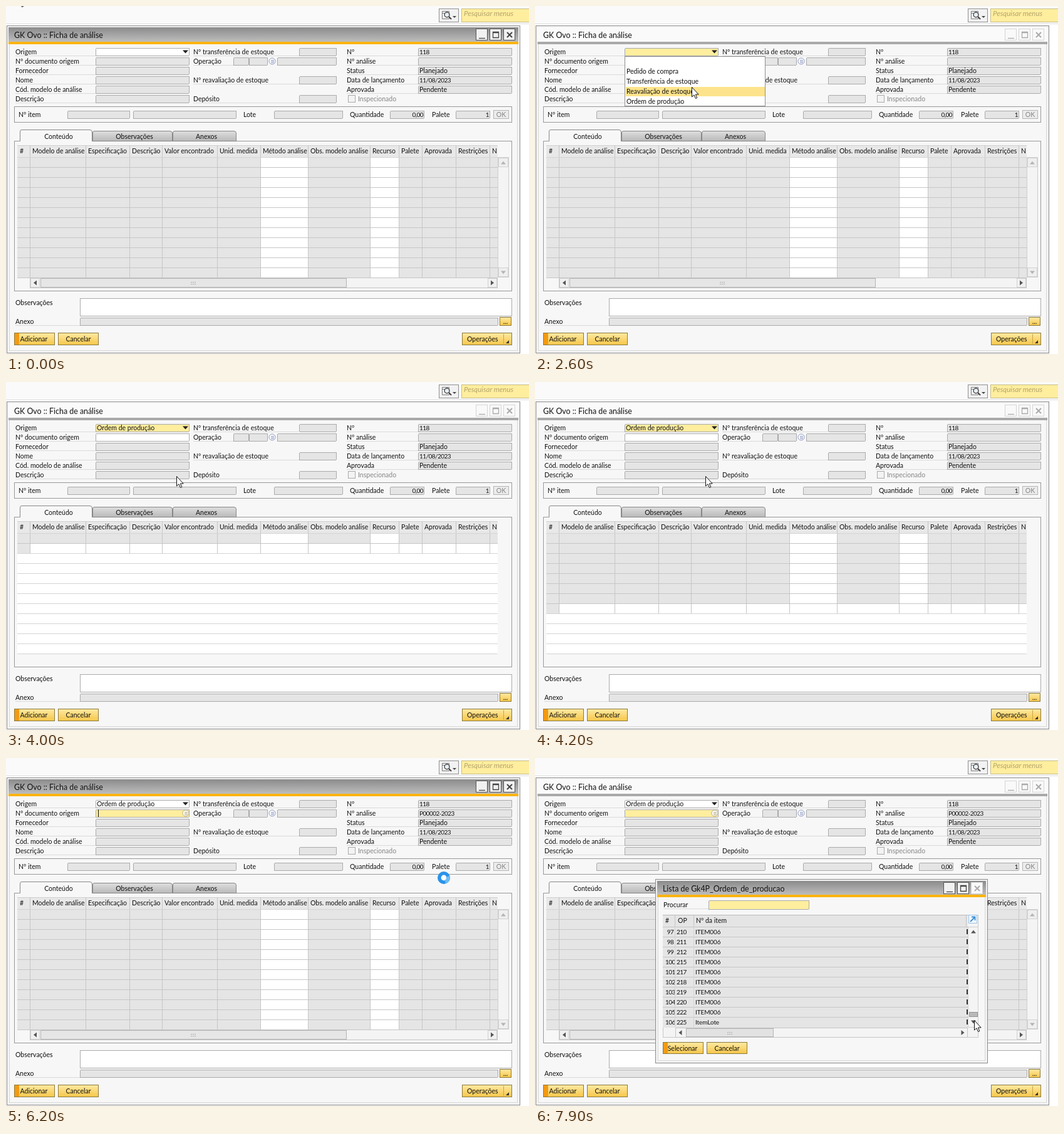
An HTML page that plays this animation: 835x555 px, repeating every 8 s.

```html
<!DOCTYPE html>
<html lang="pt-BR">
<head>
<meta charset="utf-8">
<style>
html, body { margin: 0; width: 100%; height: 100%; overflow: hidden; background: #fff; }
svg { display: block; width: 835px; height: 555px; font: 10.5px Lato, "Open Sans", sans-serif; cursor: default; }
rect, line { shape-rendering: crispEdges; }
text { fill: #111; white-space: pre; }
.num { font-size: 10px; letter-spacing: -.55px; }
.code { font-size: 10px; letter-spacing: -.1px; }
.title { font-size: 12.4px; }
.hint { font-size: 11.5px; font-style: italic; fill: #b3a56c; }
.dim { fill: #858585; }
</style>
</head>
<body>
<svg id="stage" viewBox="0 0 835 555">
  <defs>
    <linearGradient id="bar" x2="0" y2="1"><stop stop-color="#8b8b8b"/><stop offset="1" stop-color="#bdbdbd"/></linearGradient>
    <linearGradient id="gold" x2="0" y2="1"><stop stop-color="#ffeaa2"/><stop offset="1" stop-color="#f5c64a"/></linearGradient>
    <linearGradient id="tab" x2="0" y2="1"><stop stop-color="#dedede"/><stop offset="1" stop-color="#b9b9b9"/></linearGradient>
    <linearGradient id="knob" x2="0" y2="1"><stop stop-color="#fff"/><stop offset="1" stop-color="#dcdcdc"/></linearGradient>
  </defs>
</svg>
<script>
const LOOP = 8000, STEP = 100;
const GREY = '#e5e5e5', EDGE = '#ababab', YELLOW = '#ffee9e', PAGE = '#f7f7f7', GRID = '#c6c6c6';
const stage = document.getElementById('stage');

function el(tag, attrs, parent) {
  const n = document.createElementNS('http://www.w3.org/2000/svg', tag);
  for (const k in attrs) n.setAttribute(k, attrs[k]);
  return parent.appendChild(n);
}
const group = (p = stage) => el('g', {}, p);
const show = (n, on) => { n.style.display = on ? '' : 'none'; };

function box(p, x, y, w, h, fill, edge, rx = 0) {
  return edge
    ? el('rect', { x: x + .5, y: y + .5, width: w - 1, height: h - 1, fill, stroke: edge, rx }, p)
    : el('rect', { x, y, width: w, height: h, fill, rx }, p);
}
const hline = (p, x, x2, y, c) => box(p, x, y, x2 - x, 1, c);
const vline = (p, x, y, y2, c) => box(p, x, y, 1, y2 - y, c);
const path = (p, d, fill, stroke = 'none', w = 1) => el('path', { d, fill, stroke, 'stroke-width': w }, p);

// Text is placed by the middle of its line.
function text(p, x, cy, str, cls = '', anchor = 'start') {
  const n = el('text', { x, y: cy + 4, class: cls, 'text-anchor': anchor }, p);
  n.textContent = str;
  return n;
}
function field(p, x, x2, cy, value = '', end = false, fill = GREY) {
  const r = box(p, x, cy - 6, x2 - x, 13, fill, EDGE, 1.5);
  if (value) text(p, end ? x2 - 2 : x + 2, cy, value, /\d/.test(value) ? 'num' : '', end ? 'end' : 'start');
  return r;
}
function label(p, x, x2, cy, str) {
  hline(p, x, x2, cy + 6, '#dadada');
  text(p, x, cy, str);
}
function goldButton(p, x, y, w, h, str, main) {
  box(p, x, y, w, h, 'url(#gold)', '#8d7a3c', 1);
  if (main) box(p, x + 1, y + 1, 7, h - 2, '#f39a12');
  text(p, x + w / 2 + (main ? -1 : 0), y + h / 2, str, '', 'middle');
}
function arrow(p, x, y, dir, c = '#555') {
  const turn = { up: 0, right: 90, down: 180, left: 270 }[dir];
  el('path', { d: 'M-4 2.5L0-2.5L4 2.5Z', fill: c, transform: `translate(${x} ${y}) rotate(${turn})` }, p);
}
function grip(p, x, y) {
  for (let i = 0; i < 6; i++) box(p, x + i % 3 * 3, y + (i > 2 ? 2 : -1), 2, 1, '#aaa');
}
function listIcon(p, x, y, c) {
  el('circle', { cx: x, cy: y, r: 5, fill: '#fff', stroke: c }, p);
  for (const d of [-2, 0, 2]) hline(p, x - 2.5, x + 2.5, y + d, c);
}

function captionButtons(p, x, y, live, closable = true) {
  ['M5 15.5H15', 'M5.5 5.5H14.5V14.5H5.5ZM5 6.5H15', 'M6 6L14 14M14 6L6 14'].forEach((d, i) => {
    const on = live && (closable || i < 2);
    const g = el('g', { transform: `translate(${x + i * 22} ${y})` }, p);
    box(g, 0, 0, 19, 19, on ? '#f1f1f1' : '#f9f9f9', on ? '#555' : '#d5d5d5');
    path(g, d, 'none', on ? '#444' : '#aaa', i === 2 ? 2 : 1.3);
  });
}
function frame(p, x, y, w, h, bar, title, closable) {
  box(p, x, y, w, h, '#f2f2f2', '#8c8c8c', 1);
  box(p, x + 4, y + 4, w - 8, h - 8, PAGE, '#d9d9d9');
  const [off, on] = [false, true].map(live => {
    const g = group(p);
    box(g, x + 3, y + 3, w - 6, bar, live ? 'url(#bar)' : '#fafafa');
    box(g, x + 3, y + 3 + bar, w - 6, 4, live ? '#fbb40f' : '#a9a9a9');
    captionButtons(g, x + w - 71, y + 5, live, closable);
    return g;
  });
  text(p, x + 12, y + 16, title, 'title');
  return live => { show(on, live); show(off, !live); };
}

// Top strip
box(stage, 0, 0, 835, 28, '#fafafa');
hline(stage, 0, 835, 28, '#dedede');
box(stage, 691, 4, 32, 22, '#f2f2f2', '#8f8f8f', 1);
path(stage, 'M696.5 8.5H707.5V20.5H696.5ZM696.5 11.5H707.5', '#fff', '#777');
el('circle', { cx: 704, cy: 14, r: 4, fill: '#e6eef4', stroke: '#444', 'stroke-width': 1.4 }, stage);
path(stage, 'M707 17L711 21', 'none', '#444', 2);
path(stage, 'M713 16H719L716 19Z', '#444');
box(stage, 727, 4, 112, 22, YELLOW, '#c9bd85', 1);
text(stage, 731, 12, 'Pesquisar menus', 'hint');

// Main window
const win = group();
const setActive = frame(win, 1, 31, 820, 523, 23, 'GK Ovo :: Ficha de análise');

['Origem', 'Nº documento origem', 'Fornecedor', 'Nome', 'Cód. modelo de análise', 'Descrição']
  .forEach((s, i) => label(win, 15, 143, 73 + i * 15, s));
const combo = field(win, 143, 293, 73);
const doc = field(win, 143, 293, 88);
for (let i = 2; i < 6; i++) field(win, 143, 293, 73 + i * 15);
path(win, 'M282 70.5H291L286.5 75.5Z', '#222');
const origin = text(win, 145, 73, 'Ordem de produção');
const docIcon = group(win);
listIcon(docIcon, 287, 88, '#b9ad80');
const caret = vline(win, 147, 82, 94, '#111');

[['Nº transferência de estoque', 73], ['Nº reavaliação de estoque', 118], ['Depósito', 148]].forEach(([s, y]) => {
  label(win, 299, 468, y, s);
  field(win, 468, 528, y);
});
label(win, 299, 363, 88, 'Operação');
field(win, 363, 388, 88);
field(win, 388, 418, 88);
listIcon(win, 425, 88, '#8f9bc4');
field(win, 433, 528, 88);

[['Nº', '118'], ['Nº análise', ''], ['Status', 'Planejado'], ['Data de lançamento', '11/08/2023'], ['Aprovada', 'Pendente']]
  .forEach(([s, v], i) => {
    label(win, 544, 658, 73 + i * 15, s);
    field(win, 658, 808, 73 + i * 15, v);
  });
const serial = text(win, 660, 88, 'P00002-2023', 'num');
box(win, 546, 142, 12, 12, '#f3f3f3', '#aaa');
text(win, 562, 148, 'Inspecionado', 'dim');

// Item strip
box(win, 13, 160, 795, 26, PAGE, '#999');
[[20, 98, 'Nº item'], [379, 428, 'Lote'], [549, 613, 'Quantidade'], [680, 718, 'Palete']]
  .forEach(([x, x2, s]) => text(win, x, 173, s));
[[98, 198], [203, 368], [428, 538], [613, 668, '0,00'], [718, 773, '1']]
  .forEach(([a, b, v]) => field(win, a, b, 173, v, true));
box(win, 778, 166, 25, 14, '#ececec', '#b5b5b5', 1);
text(win, 790.5, 173, 'OK', 'dim', 'middle');

// Tabs
box(win, 13, 215, 795, 240, PAGE, '#999');
[[138, 266, 'Observações'], [266, 368, 'Anexos']].forEach(([a, b, s]) => {
  path(win, `M${a}.5 215.5V202Q${a}.5 199.5 ${a + 3} 199.5H${b - 4}Q${b - .5} 199.5 ${b - .5} 203V215.5Z`, 'url(#tab)', '#888');
  text(win, a + (b - a) / 2 + 3, 208, s, '', 'middle');
});
path(win, 'M22.5 215.5V200Q22.5 197.5 25 197.5H134Q137.5 197.5 137.5 201V215.5', PAGE, '#888');
hline(win, 23, 137, 215, PAGE);
text(win, 84, 208, 'Conteúdo', '', 'middle');

// Grid
const cols = [18, 38, 127, 197, 249, 337, 406, 482, 581, 627, 664, 718, 772, 785];
const heads = ['#', 'Modelo de análise', 'Especificação', 'Descrição', 'Valor encontrado', 'Unid. medida', 'Método análise',
  'Obs. modelo análise', 'Recurso', 'Palete', 'Aprovada', 'Restrições', 'N'];
const ROWS = 12;
box(win, 18, 222, 767, 211, '#fff');
box(win, 18, 222, 767, 19, '#e8e8e8');
hline(win, 18, 785, 222, '#d0d0d0');
heads.forEach((s, i) => {
  text(win, cols[i] + 4, 231, s);
  if (i) vline(win, cols[i], 222, 241, GRID);
});
for (let i = 0; i <= ROWS; i++) hline(win, 18, 785, 241 + i * 16, '#d4d4d4');
function gridRow(filled) {
  const g = group(win);
  heads.forEach((_, i) => {
    const white = i === 6 || i === 8 || (!filled && i);
    box(g, cols[i], 242, cols[i + 1] - cols[i], 15, white ? '#fff' : GREY);
    if (i) vline(g, cols[i], 242, 257, GRID);
  });
  hline(g, 18, 785, 257, filled ? GRID : '#d4d4d4');
  return g;
}
const rows = Array.from({ length: ROWS }, (_, i) => {
  const g = gridRow(true);
  g.setAttribute('transform', `translate(0 ${i * 16})`);
  return g;
});
const pending = gridRow(false);

const bars = group(win);
box(bars, 785, 241, 18, 192, '#f4f4f4', '#cfcfcf');
for (const [y, d] of [[242, 'up'], [417, 'down']]) {
  box(bars, 786, y, 16, 15, '#efefef', '#d2d2d2');
  arrow(bars, 794, y + 8, d, '#b5b5b5');
}
box(bars, 38, 433, 747, 17, '#f4f4f4', '#c4c4c4');
box(bars, 55, 434, 489, 15, '#e6e6e6', '#b5b5b5');
grip(bars, 295, 441);
for (const [x, d] of [[39, 'left'], [769, 'right']]) {
  box(bars, x, 434, 15, 15, '#f0f0f0', '#d2d2d2');
  arrow(bars, x + 7.5, 441.5, d);
}

// Footer
text(win, 15, 473, 'Observações');
box(win, 118, 466, 690, 29, '#fff', EDGE, 1);
label(win, 15, 118, 503, 'Anexo');
field(win, 118, 786, 503);
goldButton(win, 788, 496, 19, 14, '...');
goldButton(win, 13, 521, 65, 20, 'Adicionar', true);
goldButton(win, 83, 521, 65, 20, 'Cancelar');
goldButton(win, 728, 521, 80, 20, '');
text(win, 736, 531, 'Operações');
vline(win, 794, 523, 539, '#c9a545');
path(win, 'M803 533V538H798Z', '#333');

// Dropdown
const popup = group();
box(popup, 143, 80, 225, 80, '#fff', '#8f8f8f');
const hover = box(popup, 145, 81, 222, 15, '#fde48c');
['', 'Pedido de compra', 'Transferência de estoque', 'Reavaliação de estoque', 'Ordem de produção']
  .forEach((s, i) => text(popup, 146, 88 + i * 16, s));

// List dialog
const dialog = group();
frame(dialog, 192, 193, 531, 294, 22, 'Lista de Gk4P_Ordem_de_producao', false)(true);
label(dialog, 205, 277, 234, 'Procurar');
box(dialog, 277, 227, 161, 15, YELLOW, EDGE, 1.5);
box(dialog, 204, 250, 504, 196, '#f4f4f4', '#c9c9c9');
box(dialog, 204, 250, 487, 180, GREY);
hline(dialog, 204, 691, 250, '#bbb');
[[208, '#'], [228, 'OP'], [257, 'Nº da item']].forEach(([x, s]) => text(dialog, x, 259, s));
for (const x of [223, 253, 688]) vline(dialog, x, 251, 269, GRID);
box(dialog, 692, 250, 14, 14, '#f2f8ff', '#9cc3e6');
path(dialog, 'M695 261L702 254M697 253.5H702.5V259', 'none', '#3c8fd0', 1.8);

const list = Array.from({ length: 10 }, (_, i) => {
  const cy = 277 + i * 16;
  hline(dialog, 204, 691, cy - 8, GRID);
  box(dialog, 689, cy - 4, 2, 8, '#333');
  return [text(dialog, 216, cy, '', 'num', 'middle'), text(dialog, 226, cy, '', 'num'), text(dialog, 256, cy, '', 'code')];
});
for (const x of [223, 253]) vline(dialog, x, 269, 429, '#d3d3d3');
box(dialog, 691, 269, 17, 161, '#f4f4f4', '#cfcfcf');
arrow(dialog, 700, 277, 'up');
arrow(dialog, 700, 421, 'down');
const thumb = box(dialog, 693, 285, 14, 8, '#b9b9b9', '#969696');
box(dialog, 224, 430, 467, 16, '#f4f4f4', '#c4c4c4');
box(dialog, 241, 431, 140, 14, '#e2e2e2', '#b5b5b5');
grip(dialog, 307, 438);
arrow(dialog, 232, 438, 'left');
arrow(dialog, 683, 438, 'right');
goldButton(dialog, 204, 453, 65, 19, 'Selecionar', true);
goldButton(dialog, 274, 453, 65, 19, 'Cancelar');

const lastOrders = [210, 211, 212, 215, 217, 218, 219, 220, 222, 225];
function fillList(top) {
  list.forEach((cells, i) => {
    const n = top + i;
    cells[0].textContent = n;
    cells[1].textContent = lastOrders[n - 97] || 16 + 2 * n;
    cells[2].textContent = n === 106 ? 'ItemLote' : 'ITEM006';
  });
  thumb.setAttribute('y', 285.5 + Math.round((top - 1) / 96 * 120));
}

// Pointers
const pointer = path(stage, 'M.5 .5V16L4 12.8L6.5 18.5L8.8 17.5L6.4 12H11.2Z', '#fff', '#111');
const busy = group();
el('circle', { r: 7.2, fill: '#fff', stroke: '#2a93ea', 'stroke-width': 5.6 }, busy);
const glint = el('path', { d: 'M0-7.2A7.2 7.2 0 0 1 7.2 0', fill: 'none', stroke: '#6cbcf7', 'stroke-width': 5 }, busy);

// Each stop is time, then values; straight runs between.
const pointerPath = [
  [0, 19, -17], [100, 19, -17], [200, 19, -22], [300, 15, -20], [400, 13, -14], [800, 60, 14], [1200, 139, 56],
  [1300, 170, 64], [1400, 170, 64], [1700, 182, 76], [2300, 182, 76], [2700, 272, 147], [2800, 272, 147],
  [2900, 273, 151], [3500, 273, 151], [3600, 272, 150], [4400, 272, 150], [4600, 236, 100], [4700, 236, 100],
  [4800, 236, 73], [5000, 230, 88], [6600, 699, 205], [7000, 701, 288], [7200, 701, 288], [7500, 701, 410],
  [7600, 701, 410], [7900, 701, 418]
];
const busyPath = [[5900, 237, 92], [6200, 699, 191]];
const scrollPath = [[7200, 1], [7500, 92], [7600, 92], [7900, 97]];
const rowPath = [[3600, 12], [3700, 0], [3900, 0], [4000, 1], [4400, 12]];

function along(stops, t) {
  const i = stops.findIndex(s => s[0] > t);
  if (i === 0) return stops[0].slice(1);
  if (i < 0) return stops[stops.length - 1].slice(1);
  const a = stops[i - 1], b = stops[i], f = (t - a[0]) / (b[0] - a[0]);
  return a.slice(1).map((v, j) => Math.round(v + (b[j + 1] - v) * f));
}
const within = (t, a, b) => t >= a && t < b;
const move = (n, [x, y]) => n.setAttribute('transform', `translate(${x} ${y})`);

function render(time) {
  const t = Math.floor(time / STEP) * STEP;
  const spinning = within(t, 5800, 6600);
  const at = along(pointerPath, t >= 5000 && t < 6600 ? 5000 : t);

  setActive(t < 2000 || within(t, 5400, 6400));
  combo.setAttribute('fill', within(t, 1900, 5400) ? YELLOW : t < 1900 || t >= 5400 ? '#fff' : GREY);
  doc.setAttribute('fill', t >= 5400 ? YELLOW : t >= 3600 ? '#fff' : GREY);
  show(origin, t >= 3600);
  show(docIcon, t >= 5400);
  show(caret, within(t, 5500, 6400));
  show(serial, t >= 4500);

  show(popup, within(t, 2000, 3400));
  hover.setAttribute('y', 81 + 16 * Math.max(0, Math.min(4, Math.floor((at[1] - 80) / 16))));

  const [count] = along(rowPath, t);
  rows.forEach((r, i) => show(r, i < count));
  show(pending, count > 0 && count < ROWS);
  move(pending, [0, count * 16]);
  show(bars, count === ROWS);

  show(dialog, t >= 6400);
  fillList(along(scrollPath, t)[0]);

  show(pointer, !spinning);
  move(pointer, at);
  show(busy, spinning);
  move(busy, along(busyPath, t));
  glint.setAttribute('transform', `rotate(${t * .36})`);
}

const start = performance.now();
function tick() {
  render((performance.now() - start) % LOOP);
  requestAnimationFrame(tick);
}
tick();
</script>
</body>
</html>
```
